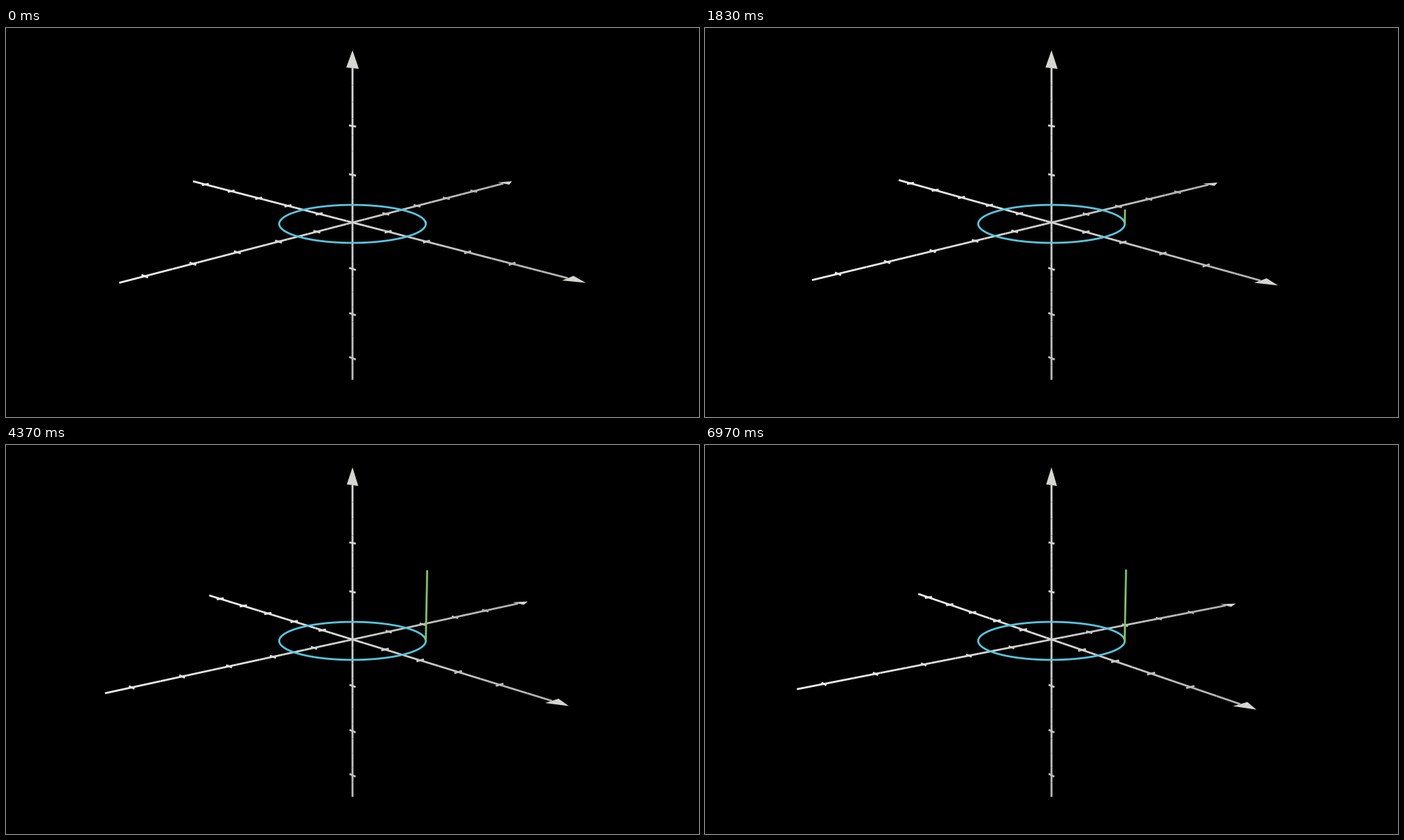
Write a matplotlib script that moves like this. It is 998 px wide and 561 px high and loops after 7.01 s.

```python
import numpy as np
import matplotlib.pyplot as plt
from matplotlib.animation import FuncAnimation
from matplotlib.collections import LineCollection, PolyCollection

W, H, DPI = 998, 561, 64
FRAMES, LOOP_MS, FPS = 210, 7010, 30
UNIT = W / (128 / 9)                  # pixels per scene unit
FOCAL, PHI = 20, np.radians(75)
START_ANGLE, SPIN = np.pi / 4, 0.02   # radians, radians per second
STROKE = 0.04 * UNIT * 72 / DPI
GREY, SHEEN = 0.733, 0.2
LIGHT = np.array([-7, -9, 10])
RADIUS = HEIGHT = 1.5
GROW_TIME = 5
TIP, TICK, PIECES = 0.35, 0.1, 20

EX, EY, EZ = np.eye(3)
# direction, half length, cross direction for ticks and tip, bright end
AXES = [(EX, 5.5, EY, -1), (EY, 5.5, EX, -1), (EZ, 3.5, EX, 1)]


def project(points, angle):
    """Perspective view of scene points, in pixels from the top left."""
    x, y, z = np.moveaxis(np.asarray(points, float), -1, 0)
    c, s = np.cos(angle), np.sin(angle)
    right, away = x * c + y * s, y * c - x * s
    up = away * np.cos(PHI) + z * np.sin(PHI)
    near = z * np.cos(PHI) - away * np.sin(PHI)
    k = UNIT * FOCAL / (FOCAL - near)
    return np.stack([W / 2 + right * k, H / 2 - up * k], axis=-1)


def smooth(u):
    def sigmoid(v):
        return 1 / (1 + np.exp(-v))
    edge = sigmoid(-5)
    u = min(max(u, 0), 1)
    return (sigmoid(10 * (u - 0.5)) - edge) / (1 - 2 * edge)


def shade(mids, angle, dim, bright):
    """Sheen along the axis plus a little light from one side."""
    a, b = project([dim, bright], angle)
    frac = (project(mids, angle) - a) @ (b - a) / ((b - a) @ (b - a))
    ray = LIGHT - mids
    cube = (ray.sum(axis=1) / np.linalg.norm(ray, axis=1)) ** 3
    light = np.where(cube < 0, 0.25, 0.5) * cube
    level = np.clip(GREY + SHEEN * np.clip(frac, 0, 1) + light, 0, 1)
    return np.repeat(level[:, None], 3, axis=1)


def axis_parts(d, half, cross):
    cuts = np.linspace(-half, half - TIP, PIECES + 1)[:, None] * d
    pieces = np.stack([cuts[:-1], cuts[1:]], axis=1)
    n = int(half)
    at = np.array([i for i in range(-n, n) if i])[:, None] * d
    ticks = np.stack([at - TICK * cross, at + TICK * cross], axis=1)
    base = (half - TIP) * d
    tip = np.array([half * d, base + TIP / 2 * cross, base - TIP / 2 * cross])
    return np.concatenate([pieces, ticks]), tip


fig = plt.figure(figsize=(W / DPI, H / DPI), dpi=DPI, facecolor="black")
ax = fig.add_axes([0, 0, 1, 1])
ax.set(xlim=(0, W), ylim=(H, 0))
ax.axis("off")

parts = [axis_parts(d, half, cross) for d, half, cross, _ in AXES]
lines = [LineCollection([], linewidths=STROKE, capstyle="butt", snap=False)
         for _ in AXES]
for line in lines:
    ax.add_collection(line)
tips = PolyCollection([], facecolors="#d5d5d1", edgecolors="none", snap=False)
ax.add_collection(tips)

turn = np.linspace(0, 2 * np.pi, 181)
ring = RADIUS * np.stack([np.cos(turn), np.sin(turn), 0 * turn], axis=1)
ax.plot(*project(ring, 0).T, color="#58c4dd", lw=STROKE, snap=False,
        solid_joinstyle="round")
post, = ax.plot([], [], color="#83c167", lw=STROKE, snap=False,
                solid_capstyle="butt")
foot = RADIUS * (EX + EY) / np.sqrt(2)


def draw(i):
    t = i / FPS
    angle = START_ANGLE + SPIN * t
    for line, (segs, _), (d, half, _, end) in zip(lines, parts, AXES):
        line.set_segments(project(segs, angle))
        line.set_color(shade(segs.mean(axis=1), angle,
                             -end * half * d, end * half * d))
    tips.set_verts([project(tip, angle) for _, tip in parts])

    grown = smooth(t / GROW_TIME)
    post.set_data(*project([foot, foot + HEIGHT * grown * EZ], angle).T)
    post.set_visible(grown > 0)
    return [*lines, tips, post]


anim = FuncAnimation(fig, draw, frames=FRAMES, interval=LOOP_MS / FRAMES,
                     repeat=True, repeat_delay=0)
plt.show()
```
